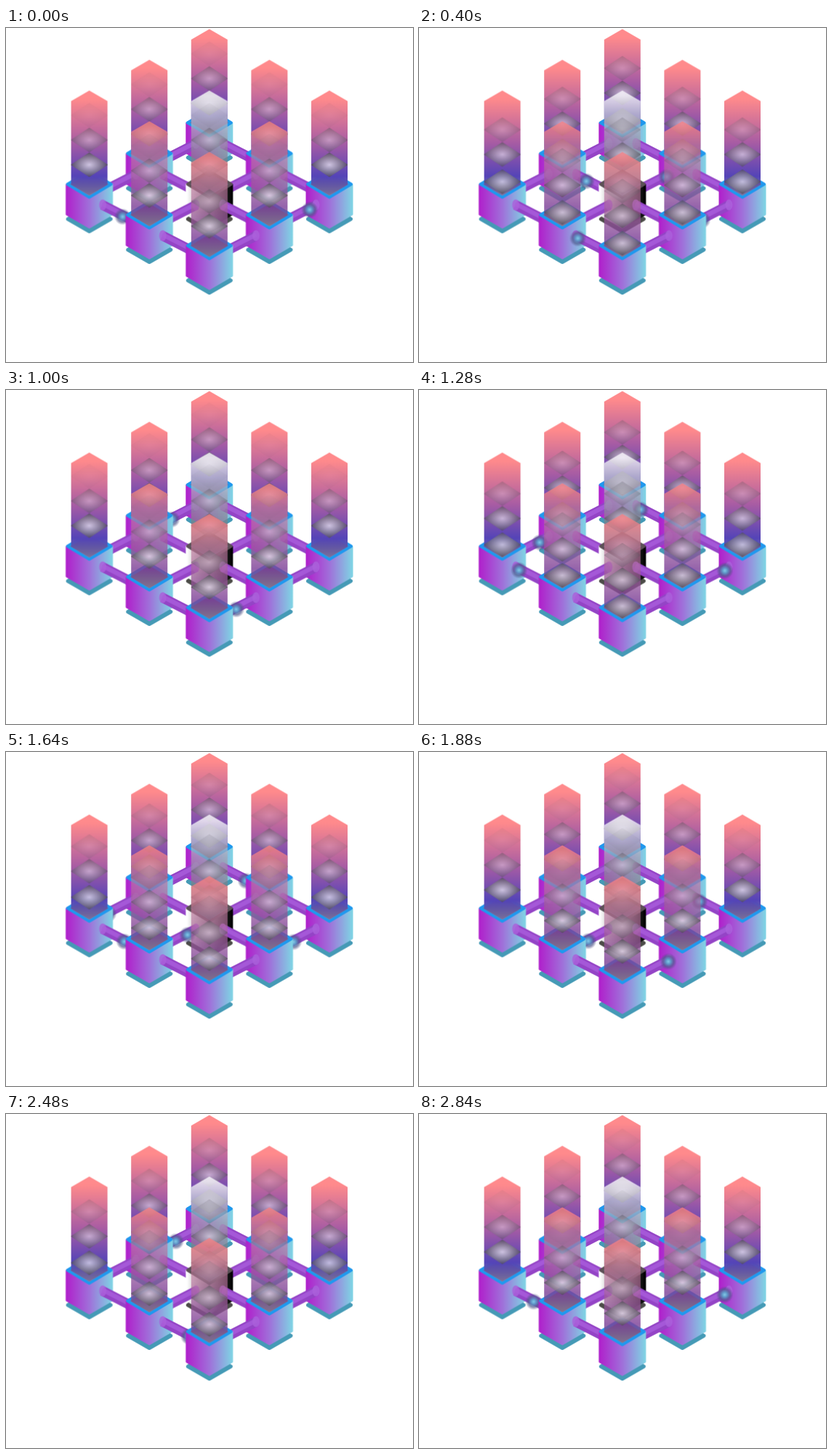
Animation of 560 by 460 pixels, one loop 2.88 s. Source, as an HTML page:

```html
<!DOCTYPE html>
<html lang="en">
<head>
<meta charset="utf-8">
<title>Connected blocks</title>
<style>
  html, body { margin: 0; width: 100%; height: 100%; overflow: hidden; background: #fff; }
  svg { display: block; }
  .tile { animation: rise 2880ms linear infinite; }
  .ball { opacity: 0; animation: travel 2880ms linear infinite; }
  @keyframes rise {
    0% { transform: translateY(0); opacity: .65; }
    8% { transform: translateY(-3px); opacity: .7; }
    28% { transform: translateY(-27px); opacity: .75; }
    100% { transform: translateY(-100.6px); opacity: 0; }
  }
  @keyframes travel {
    0% { transform: translate(0, 0); opacity: 1; }
    19% { transform: translate(38.3px, 19.6px); opacity: 1; }
    19.01%, 100% { transform: translate(38.3px, 19.6px); opacity: 0; }
  }
</style>
</head>
<body>
<svg id="stage" width="560" height="460" viewBox="0 0 560 460">
  <defs>
    <linearGradient id="body">
      <stop offset="0" stop-color="#b022cc"/>
      <stop offset=".5" stop-color="#a070da"/>
      <stop offset="1" stop-color="#80d2e4"/>
    </linearGradient>
    <linearGradient id="mono">
      <stop offset="0" stop-color="#fff"/>
      <stop offset="1" stop-color="#000"/>
    </linearGradient>
    <linearGradient id="lid" x2="0" y2="1">
      <stop offset="0" stop-color="#4c4770"/>
      <stop offset="1" stop-color="#a396b6"/>
    </linearGradient>
    <linearGradient id="tower" x2="0" y2="1">
      <stop offset=".08" stop-color="#ff8a8c"/>
      <stop offset=".5" stop-color="#a75ca4"/>
      <stop offset=".82" stop-color="#5444b8"/>
      <stop offset="1" stop-color="#6c6492" stop-opacity=".7"/>
    </linearGradient>
    <linearGradient id="towerNear" x2="0" y2="1">
      <stop offset=".06" stop-color="#f48084" stop-opacity=".8"/>
      <stop offset=".38" stop-color="#bc749c" stop-opacity=".62"/>
      <stop offset=".82" stop-color="#7d4198" stop-opacity=".82"/>
      <stop offset="1" stop-color="#746880" stop-opacity=".7"/>
    </linearGradient>
    <linearGradient id="towerMono" x2="0" y2="1">
      <stop offset=".05" stop-color="#f4f2f8" stop-opacity=".85"/>
      <stop offset=".4" stop-color="#a8a6b2" stop-opacity=".64"/>
      <stop offset="1" stop-color="#50484c" stop-opacity=".66"/>
    </linearGradient>
    <radialGradient id="shine">
      <stop offset="0" stop-color="#eeecf2"/>
      <stop offset="1" stop-color="#504e56"/>
    </radialGradient>
    <radialGradient id="glow">
      <stop offset="0" stop-color="#84cae8"/>
      <stop offset=".3" stop-color="#5c9cc8" stop-opacity=".95"/>
      <stop offset=".65" stop-color="#50588c" stop-opacity=".7"/>
      <stop offset="1" stop-color="#4a4a7c" stop-opacity="0"/>
    </radialGradient>
  </defs>
</svg>
<script>
const LOOP = 2880;
const stage = document.getElementById("stage");

// Start times of the balls, keyed by cell and side of the pipe.
const departures = {
  "00l": [520, 2077], "00r": [1181],
  "01l": [1094], "01r": [186],
  "10l": [350], "10r": [1806],
  "02r": [1210, 2483], "20l": [1194, 2750],
  "11l": [1469],
  "12r": [353, 1963], "21l": [606, 1863]
};

function add(parent, tag, attrs = {}) {
  const node = document.createElementNS("http://www.w3.org/2000/svg", tag);
  for (const key in attrs) node.setAttribute(key, attrs[key]);
  return parent.appendChild(node);
}

const rhombus = (w, h, y = 0) => `M${-w} ${y}L0 ${y - h}L${w} ${y}L0 ${y + h}Z`;
const rounded = (paint, width) => ({ stroke: paint, "stroke-width": width, "stroke-linejoin": "round" });

function addCube(cell, mono) {
  const paint = mono ? "url(#mono)" : "url(#body)";
  const shadow = mono ? "#4c4c48" : "#459ab6";
  add(cell, "path", { d: rhombus(29.5, 17, 47.5), fill: shadow, ...rounded(shadow, 5) });
  add(cell, "path", { d: "M-31 0L0-18L31 0V41L0 59L-31 41Z", fill: paint, ...rounded(paint, 3) });
  add(cell, "path", { d: rhombus(30, 18, -.5), fill: "url(#lid)", ...rounded(mono ? "#5c5056" : "#2098ee", 4) });
}

function addPipe(cell, side, starts = []) {
  const pipe = add(cell, "g", { transform: `scale(${side} 1)` });
  add(pipe, "path", { d: "M18 28L56 47.5", stroke: "#9444c6", "stroke-width": 13.5 });
  add(pipe, "path", { d: "M18 26.5L56 46", stroke: "#a558d8", "stroke-width": 6 });
  add(pipe, "ellipse", { cx: 18.5, cy: 28, rx: 5, ry: 7.5, fill: "#aa60da", opacity: .85 });
  for (const start of starts) {
    const ball = add(pipe, "circle", { class: "ball", cx: 18, cy: 30, r: 11.5, fill: "url(#glow)" });
    ball.style.animationDelay = `${start - LOOP}ms`;
  }
}

function addTower(cell, paint) {
  add(cell, "path", { d: "M-25-115L0-129.5L25-115V0L0 15L-25 0Z", fill: `url(#${paint})` });
  for (const age of [2720, 1760, 800]) {
    const tile = add(cell, "path", { class: "tile", d: rhombus(25, 16.5, -.5), fill: "url(#shine)", ...rounded("url(#shine)", 1) });
    tile.style.animationDelay = `${-age}ms`;
  }
}

for (let depth = 0; depth <= 4; depth++) {
  for (let i = 0; i <= 2; i++) {
    const j = depth - i;
    if (j < 0 || j > 2) continue;
    const cell = add(stage, "g", { transform: `translate(${279.8 + 82.6 * (i - j)} ${131 + 42.3 * depth})` });
    const mono = i === 1 && j === 1;
    const near = i > 0 && j > 0;
    addCube(cell, mono);
    if (j < 2) addPipe(cell, -1, departures[`${i}${j}l`]);
    if (i < 2) addPipe(cell, 1, departures[`${i}${j}r`]);
    addTower(cell, mono ? "towerMono" : near ? "towerNear" : "tower");
  }
}
</script>
</body>
</html>
```
